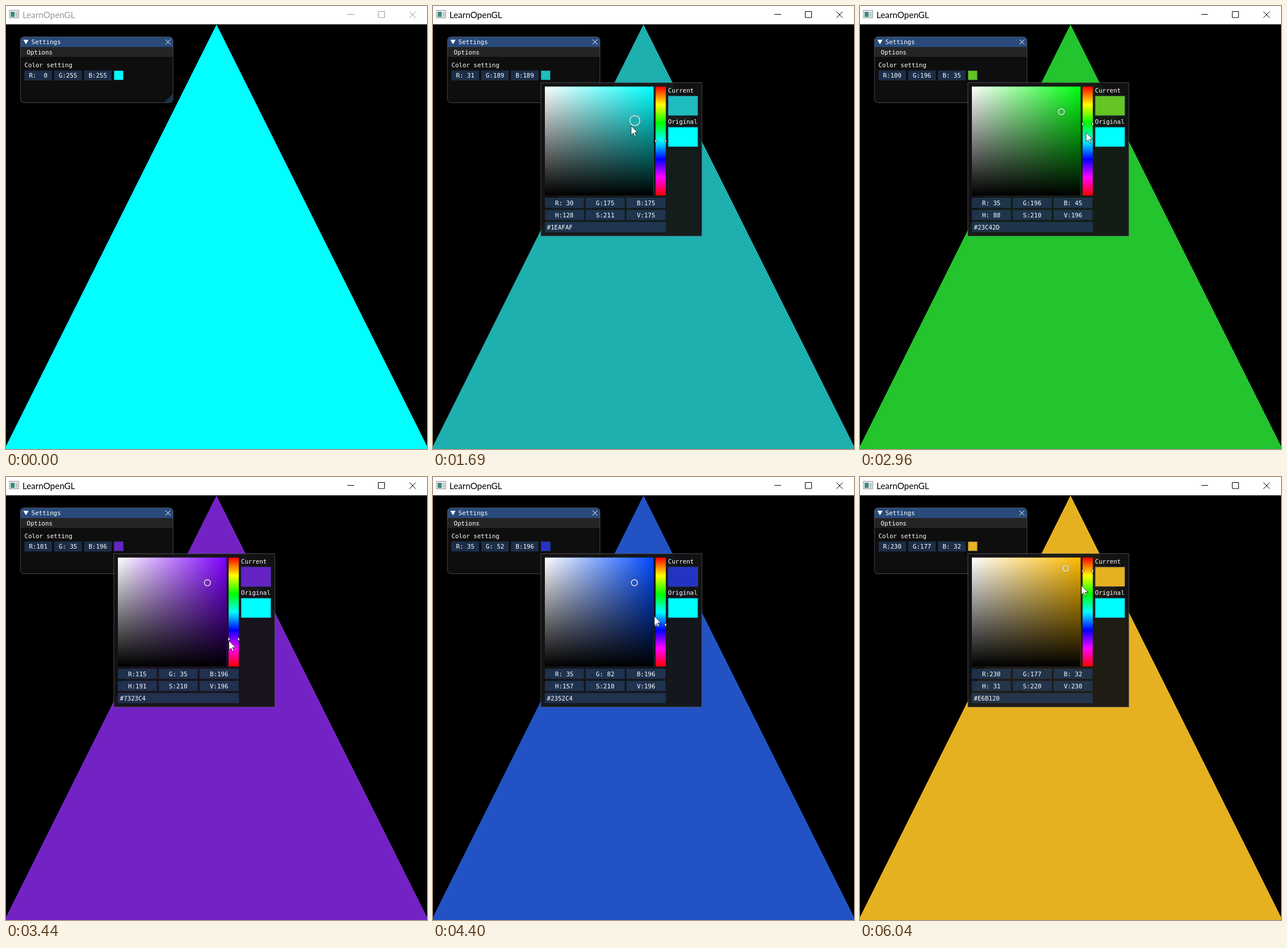
An HTML page for the animation above (6.1 s loop, 730 px wide and 767 px high).

```html
<!DOCTYPE html>
<html lang="en">
<head>
<meta charset="utf-8">
<title>Color picker</title>
<style>
html, body { margin: 0; width: 100%; height: 100%; overflow: hidden; background: #000; }
svg { display: block; width: 100%; height: 100%; }
text { font: 10.62px "DejaVu Sans Mono", monospace; fill: #fff; white-space: pre; }
.title { font: 15px Lato, sans-serif; }
.mid { text-anchor: middle; }
.field { fill: #294a7a; fill-opacity: .54; }
.edge { fill: none; stroke: #6e6e80; stroke-opacity: .6; }
.swatch { stroke: #294a7a; stroke-opacity: .54; }
</style>
</head>
<body>
<svg viewBox="0 0 730 767" xmlns="http://www.w3.org/2000/svg">
  <defs>
    <linearGradient id="sat"><stop stop-color="#fff"/><stop id="pure" offset="1"/></linearGradient>
    <linearGradient id="val" x2="0" y2="1"><stop stop-opacity="0"/><stop offset="1"/></linearGradient>
    <linearGradient id="rainbow" x2="0" y2="1"></linearGradient>
  </defs>

  <rect width="730" height="767"/>
  <path id="tri" d="M365 32L732.5 767H-2.5Z" shape-rendering="crispEdges"/>

  <rect width="730" height="31.7" fill="#fff"/>
  <g>
    <rect x="6" y="7.5" width="16" height="13" fill="#f4f4f4" stroke="#8a8f94"/>
    <rect x="8" y="10" width="7" height="9" fill="#3f8a80"/>
    <rect x="16" y="10" width="4.5" height="9" fill="#c4cacc"/>
  </g>
  <text id="name" class="title" x="28.5" y="20.5">LearnOpenGL</text>
  <path id="buttons" fill="none" d="M592 14.5H603.5M645.5 9.5H656.5V20H645.5ZM699.5 9.5L710.5 20.5M710.5 9.5L699.5 20.5"/>

  <g id="settings">
    <rect x="25" y="53.5" width="264.5" height="114" rx="6.5" fill="#0e0e0e"/>
    <path d="M25 71V60Q25 53.5 31.5 53.5H283Q289.5 53.5 289.5 60V71Z" fill="#294a7a"/>
    <rect x="25" y="71" width="264.5" height="17" fill="#242424"/>
    <path d="M289 152V161Q289 167 283 167H274Z" fill="#1a314b"/>
    <rect class="edge" x="25" y="53.5" width="264.5" height="114" rx="6.5"/>
    <path d="M30 58.5H39.2L34.6 66.3Z" fill="#fff"/>
    <path d="M276.5 58L285 66.5M285 58L276.5 66.5" stroke="#fff"/>
    <text x="44" y="66">Settings</text>
    <text x="36" y="84">Options</text>
    <text x="32" y="106">Color setting</text>
    <rect id="chip" class="swatch" x="187.3" y="112" width="16" height="16"/>
  </g>

  <g id="popup">
    <rect x="187" y="132.7" width="279.2" height="265.6" fill="#141414" fill-opacity=".94"/>
    <rect class="edge" x="187" y="132.7" width="279.2" height="265.6"/>
    <rect x="194" y="139.5" width="188.5" height="188.5" fill="url(#sat)"/>
    <rect x="194" y="139.5" width="188.5" height="188.5" fill="url(#val)"/>
    <rect x="386" y="139.5" width="17.7" height="188.5" fill="url(#rainbow)"/>
    <g id="marks" fill="#fff" stroke="#000" stroke-width=".8">
      <path d="M385-3.5L389 0L385 3.5Z"/><path d="M404.8-3.5L400.8 0L404.8 3.5Z"/>
    </g>
    <g id="dot">
      <circle id="halo" fill="none" stroke="#808080"/>
      <circle id="ring" stroke="#fff" stroke-width="1.1"/>
    </g>
    <text x="407.5" y="150">Current</text>
    <rect id="current" class="swatch" x="407.8" y="155.8" width="51.4" height="33.9"/>
    <text x="407.5" y="204">Original</text>
    <rect class="swatch" x="407.8" y="209.8" width="51.4" height="33.9" fill="#0ff"/>
    <rect class="field" x="194" y="374" width="209.8" height="17.5"/>
    <text id="hex" x="197.5" y="387"></text>
  </g>

  <path id="cursor" d="M0 0V16L3.7 12.6L6.2 18.4L8.7 17.3L6.2 11.6H11.4Z" fill="#fff" stroke="#000" stroke-width=".7"/>
</svg>
<script>
const LOOP = 6100, HOLD = 140, STEP = 74.68;
const LEFT = 194, TOP = 139.5, SIDE = 188.5;
const $ = id => document.getElementById(id);
const set = (id, attrs) => { for (const a in attrs) $(id).setAttribute(a, attrs[a]); };
const clamp = (v, lo, hi) => Math.max(lo, Math.min(v, hi));
const css = c => `rgb(${c})`;

// Turning points of the hand: tick, x, y
const turns = [
  [0, 648, 750], [8, 190, 131], [10, 195, 121],
  [13, 372, 152], [19, 351.6, 188.3], [20, 350, 198.6], [22, 337, 216], [26, 349.23, 183.1],
  [28, 394, 233.75], [30, 399, 179.34], [31, 399, 179.34], [34, 397, 160], [42, 387, 278.1],
  [44, 386.5, 283.58], [47, 392, 322.4], [49, 391, 296.5], [56, 392, 255.92],
  [60, 359.3, 196.45], [62, 359.3, 187.55], [66, 356.63, 158],
  [68, 392, 255.92], [76, 390, 162.53], [79, 384, 188]
];
// Control held, with the first and last tick of the drag
const drags = [["square", 13, 26], ["bar", 28, 56], ["square", 60, 66], ["bar", 68, 76]];
const ACTIVE = 9, OPEN = 10;

function hand(k) {
  const i = clamp(turns.findIndex(p => p[0] >= k), 1, turns.length - 1);
  const [k0, x0, y0] = turns[i - 1], [k1, x1, y1] = turns[i];
  const u = clamp((k - k0) / (k1 - k0), 0, 1);
  return [x0 + (x1 - x0) * u, y0 + (y1 - y0) * u];
}

// The picked color follows the hand one tick late
function picked(k) {
  const c = { h: 127.5, s: 255, v: 255, held: false };
  for (const [part, from, to] of drags) {
    if (k <= from) break;
    const [x, y] = hand(Math.min(k - 1, to)), down = clamp((y - TOP) / SIDE, 0, 1) * 255;
    if (part === "bar") c.h = down;
    else {
      c.s = clamp((x - LEFT) / SIDE, 0, 1) * 255;
      c.v = 255 - down;
    }
    c.held = part === "square" && k - 1 <= to;
  }
  return c;
}

const toRgb = ({ h, s, v }) => [5, 3, 1].map(n => {
  const q = (n + h / 255 * 6) % 6;
  return Math.round(v * (1 - s / 255 * clamp(Math.min(q, 4 - q), 0, 1)));
});
const pure = h => css(toRgb({ h, s: 255, v: 255 }));

function make(parent, tag, attrs) {
  const e = document.createElementNS("http://www.w3.org/2000/svg", tag);
  for (const a in attrs) e.setAttribute(a, attrs[a]);
  return $(parent).appendChild(e);
}

function addFields(group, x0, gap, w, y) {
  return [0, 1, 2].map(i => {
    const x = x0 + i * gap;
    make(group, "rect", { class: "field", x, y, width: w, height: 17.4 });
    return make(group, "text", { class: "mid", x: x + w / 2, y: y + 12.7 });
  });
}

for (let i = 0; i <= 6; i++) make("rainbow", "stop", { offset: i / 6, "stop-color": pure(i * 42.5) });
const row = addFields("settings", 32, 51.6, 47.8, 111.5);
const rgbRow = addFields("popup", 194, 70.8, 67.5, 332);
const hsvRow = addFields("popup", 194, 70.8, 67.5, 353);
const fill = (cells, names, values) => cells.forEach((cell, i) => {
  cell.textContent = names[i] + ":" + String(Math.round(values[i])).padStart(3);
});

function draw(t) {
  const k = t < HOLD ? -1 : Math.floor((t - HOLD) / STEP + .25);
  const c = picked(k), now = toRgb(c), last = toRgb(picked(k - 1));
  const ink = k >= ACTIVE ? "#000" : "#999";

  set("tri", { fill: css(now) });
  $("name").style.fill = ink;
  set("buttons", { stroke: ink });
  set("chip", { fill: css(last) });
  fill(row, "RGB", last);

  set("popup", { visibility: k >= OPEN ? "visible" : "hidden" });
  set("pure", { "stop-color": pure(c.h) });
  set("current", { fill: css(last) });
  set("marks", { transform: `translate(0 ${TOP + c.h / 255 * SIDE})` });
  set("dot", { transform: `translate(${LEFT + c.s / 255 * SIDE} ${TOP + (1 - c.v / 255) * SIDE})` });
  const r = c.held ? 8.7 : 5.2;
  set("halo", { r: r + .7 });
  set("ring", { r, fill: css(now) });
  fill(rgbRow, "RGB", now);
  fill(hsvRow, "HSV", [c.h, c.s, c.v]);
  $("hex").textContent = "#" + now.map(n => n.toString(16).padStart(2, "0")).join("").toUpperCase();

  set("cursor", { visibility: k >= 0 ? "visible" : "hidden", transform: `translate(${hand(k).join(" ")})` });
}

const begin = performance.now();
function loop() {
  draw((performance.now() - begin) % LOOP);
  requestAnimationFrame(loop);
}
loop();
</script>
</body>
</html>
```
